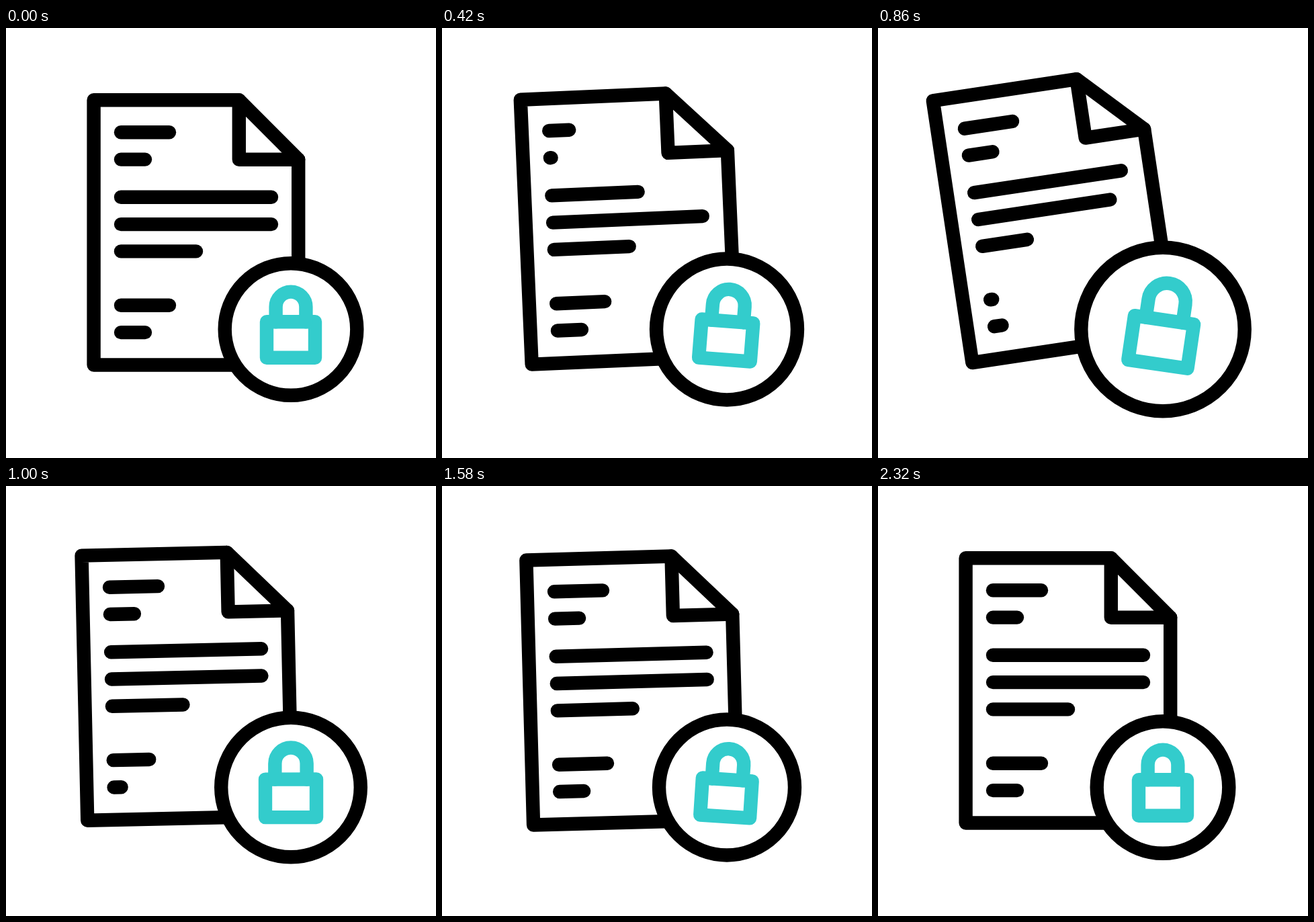
Write an HTML page with a canvas that moves like this. It is 640 by 640 pixels and loops after 2.4 s.

```html
<!DOCTYPE html>
<html lang="en">
<head>
<meta charset="utf-8">
<title>Protected document</title>
<style>
  html, body { margin: 0; width: 100%; height: 100%; overflow: hidden; background: #fff; }
  canvas { display: block; width: 100vmin; height: 100vmin; }
</style>
</head>
<body>
<canvas id="stage" width="640" height="640"></canvas>
<script>
const ctx = document.getElementById('stage').getContext('2d');
const LOOP = 2400;
const PEAK_TIME = 850;
const HALF_SWING = 350;
const INK = '#000', TEAL = '#33cccc', PAPER = '#fff';
const STROKE = 20.4;
const HUB = { x: 424, y: 448.5, r: 98.3 };
const FOOT = { x: 130.6, y: 501.5 };

const paragraphs = [
  { y: 155.3, lengths: [72, 36] },
  { y: 251.8, lengths: [224, 224, 112] },
  { y: 412.8, lengths: [72, 36] }
];
const LINE_GAP = 40.3;

const clamp = u => Math.min(1, Math.max(0, u));
const mix = (a, b, u) => a + (b - a) * u;
const easeInOut = u => (1 - Math.cos(Math.PI * clamp(u))) / 2;
const easeOut = (u, power) => 1 - (1 - clamp(u)) ** power;
const radians = deg => deg * Math.PI / 180;

// Builds up to a peak, snaps back past rest, then swings until it has settled.
function sway(t, { peak, rebound, fade = 0.6, power = 1.88, turn = 1150 }) {
  if (t < PEAK_TIME) return peak * (t / PEAK_TIME) ** power;
  if (t < turn) {
    return mix(peak, rebound, easeOut((t - PEAK_TIME) / (turn - PEAK_TIME), 1.45));
  }
  const swings = (t - turn) / HALF_SWING;
  const n = Math.floor(swings);
  const extreme = i => i < 3 ? rebound * (-fade) ** i : 0;
  return mix(extreme(n), extreme(n + 1), easeInOut(swings - n));
}

// Lines are wiped and rewritten one after another.
function visiblePart(t, index) {
  const age = t - 110 - 100 * index;
  const wipe = 245, rewrite = 400;
  return age < wipe ? 1 - easeInOut(age / wipe) : easeOut((age - wipe) / rewrite, 3);
}

function polyline(points, closed) {
  ctx.beginPath();
  points.forEach(([x, y]) => ctx.lineTo(x, y));
  if (closed) ctx.closePath();
  ctx.stroke();
}

function drawText(t) {
  let index = 0;
  for (const { y, lengths } of paragraphs) {
    lengths.forEach((length, row) => {
      const part = visiblePart(t, index++);
      const lineY = y + row * LINE_GAP;
      if (part > 0.005) polyline([[171, lineY], [171 + length * part, lineY]]);
    });
  }
}

function drawDocument(t) {
  const dx = sway(t, { peak: 11.5, rebound: -18.5, fade: 0.44, turn: 1120 });
  const dy = sway(t, { peak: -3.4, rebound: -4, fade: 1 });
  const tilt = sway(t, { peak: -9.2, rebound: 3.25 });
  const left = FOOT.x, bottom = FOOT.y;
  const right = 435.2, top = 107.3, foldX = 346.8, foldY = 195.8;
  ctx.save();
  ctx.translate(left + dx, bottom + dy);
  ctx.rotate(radians(tilt));
  ctx.translate(-left, -bottom);
  ctx.strokeStyle = INK;
  polyline([[left, top], [foldX, top], [right, foldY], [right, bottom], [left, bottom]], true);
  polyline([[foldX, top], [foldX, foldY], [right, foldY]]);
  drawText(t);
  ctx.restore();
}

function drawBadge(t) {
  const radius = HUB.r + sway(t, { peak: 25, rebound: -5.6 });
  const k = radius / HUB.r;
  ctx.save();
  ctx.translate(HUB.x, HUB.y);
  ctx.beginPath();
  ctx.arc(0, 0, radius, 0, 2 * Math.PI);
  ctx.fillStyle = PAPER;
  ctx.fill();
  ctx.strokeStyle = INK;
  ctx.stroke();

  // The lock grows with the badge while its stroke keeps its width.
  ctx.rotate(radians(sway(t, { peak: 9.1, rebound: -5.2, fade: 0.95, power: 1 })));
  ctx.strokeStyle = TEAL;
  const side = 36 * k, top = -11.3 * k, bottom = 42.3 * k, bow = 22.4 * k;
  polyline([[-side, top], [side, top], [side, bottom], [-side, bottom]], true);
  ctx.beginPath();
  ctx.moveTo(-bow, top);
  ctx.arc(0, -33.5 * k, bow, Math.PI, 0);
  ctx.lineTo(bow, top);
  ctx.stroke();
  ctx.restore();
}

function draw(t) {
  ctx.fillStyle = PAPER;
  ctx.fillRect(0, 0, 640, 640);
  ctx.lineWidth = STROKE;
  ctx.lineCap = ctx.lineJoin = 'round';
  drawDocument(t);
  drawBadge(t);
}

const began = performance.now();
function tick() {
  draw((performance.now() - began) % LOOP);
  requestAnimationFrame(tick);
}
tick();
</script>
</body>
</html>
```
